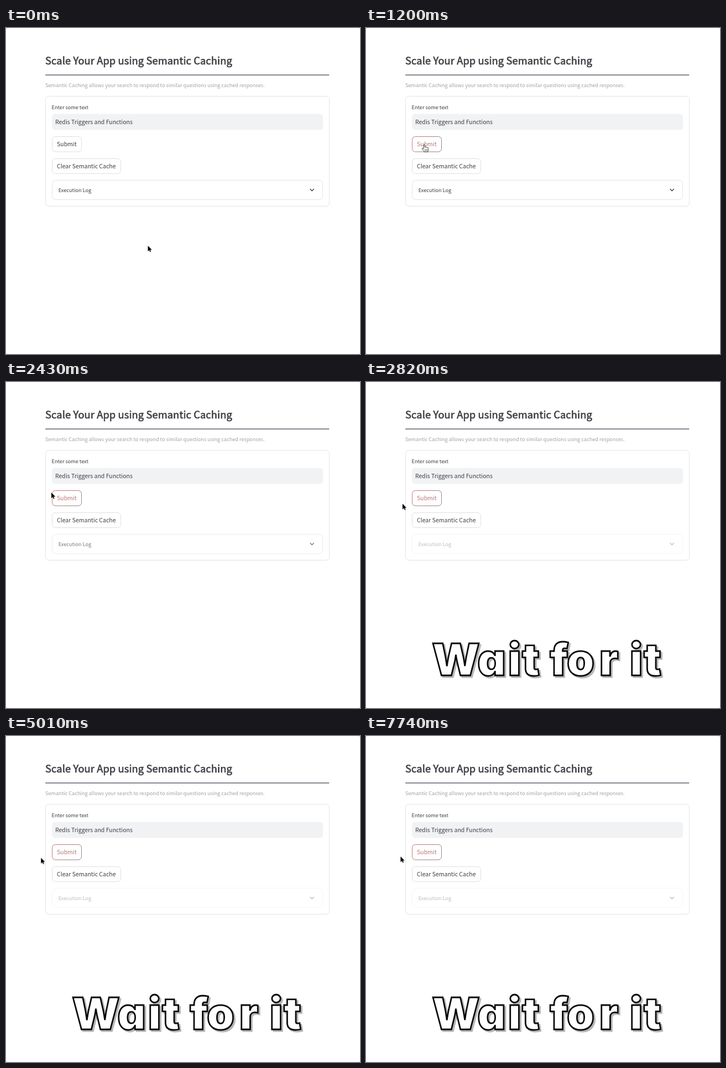
Write an HTML page that moves like this. It is 640 px wide and 590 px high and loops after 8000 ms.

```html
<!DOCTYPE html>
<html lang="en">
<head>
<meta charset="utf-8">
<title>Semantic Caching demo</title>
<style>
  html, body { margin: 0; width: 100%; height: 100%; overflow: hidden; background: #fff; }
  svg { display: block; width: 640px; height: 590px; }

  text { font-family: "Noto Sans CJK JP", "Noto Sans CJK SC", "Noto Sans CJK", "Open Sans", sans-serif; fill: #3e3e44; }
  .md { font-size: 10.5px; }
  .sm { font-size: 9.14px; }
  .title { font-size: 18.28px; letter-spacing: .12px; stroke: #3e3e44; stroke-width: .65px; }
  .caption { fill: #a2a2a6; }
  .box { fill: #fff; stroke: #e4e4e6; }
  .button { fill: #fff; stroke: #dfdfe2; }

  .submit-label { animation: label 8s step-end infinite; }
  .focus { animation: hover 8s step-end infinite; }
  .log { animation: stale 8s linear infinite; }
  .wait { animation: pop 8s step-end infinite; filter: drop-shadow(3px 3px 0 #b6b6b6); }
  .wait text {
    font: 900 80px Inter, Lato, sans-serif;
    font-feature-settings: "cv11";
    text-anchor: middle;
    fill: #fff; stroke: #0a0a0a; stroke-width: 2.8px; stroke-miterlimit: 3;
  }

  .cursor { animation: move 8s linear infinite; }
  .arrow { animation: arrow 8s step-end infinite; }
  .hand { animation: hand 8s step-end infinite; }

  @keyframes label { 0% { fill: #3e3e44; } 6.1%, 100% { fill: #c47270; } }
  @keyframes hover { 0% { opacity: 0; } 6.1%, 100% { opacity: 1; } }
  @keyframes stale {
    0% { opacity: 1; }
    22.5% { opacity: 1; animation-timing-function: ease-in; }
    35%, 100% { opacity: .33; }
  }
  @keyframes pop { 0% { opacity: 0; } 33%, 100% { opacity: 1; } }
  @keyframes arrow { 0% { opacity: 1; } 6.1% { opacity: 0; } 30%, 100% { opacity: 1; } }
  @keyframes hand { 0% { opacity: 0; } 6.1% { opacity: 1; } 30%, 100% { opacity: 0; } }
  @keyframes move {
    0%, .4% { transform: translate(256.5px, 394px); }
    3% { transform: translate(178px, 288px); }
    5.63% { transform: translate(128.5px, 224px); }
    7% { transform: translate(115px, 216px); }
    8.25%, 10.1% { transform: translate(109px, 213px); }
    15%, 22.5% { transform: translate(105.5px, 211px); }
    27% { transform: translate(95px, 204px); }
    30.38% { transform: translate(82px, 200px); }
    32.3% { transform: translate(74px, 211px); }
    35.25% { transform: translate(66px, 220.3px); }
    40.1%, 73.1% { transform: translate(63.2px, 220.5px); }
    74% { transform: translate(63px, 222px); }
    74.7%, 77.6% { transform: translate(63px, 220px); }
    79.5%, 85.1% { transform: translate(62.5px, 219px); }
    85.9%, 100% { transform: translate(62.5px, 218px); }
  }
</style>
</head>
<body>
<svg viewBox="0 0 640 590">
  <defs>
    <linearGradient id="focusLine">
      <stop offset="0" stop-color="#bd7f7f"/>
      <stop offset="1" stop-color="#958488"/>
    </linearGradient>
  </defs>
  <rect width="640" height="590" fill="#d4d4d4"/>
  <rect width="640" height="590" rx="3" fill="#fff"/>

  <text class="title" x="71" y="66.3">Scale Your App using Semantic Caching</text>
  <rect x="71" y="84" width="513.5" height="2" rx="1" fill="#89868f"/>
  <text class="sm caption" x="71" y="107.2">Semantic Caching allows your search to respond to similar questions using cached responses.</text>

  <rect class="box" x="71.5" y="123.5" width="513" height="199" rx="5.8"/>
  <text class="sm" x="82.6" y="147">Enter some text</text>
  <rect x="83" y="155.5" width="490" height="29" rx="5.8" fill="#f1f2f4"/>
  <text class="md" x="89" y="174">Redis Triggers and Functions</text>

  <rect class="button" x="83.5" y="196.5" width="53" height="27.5" rx="5.8"/>
  <rect class="focus" x="83.5" y="196.5" width="53" height="27.5" rx="5.8" fill="#fff" stroke="url(#focusLine)"/>
  <text class="md submit-label" x="92" y="214.2">Submit</text>

  <rect class="button" x="83.5" y="236.5" width="124" height="27" rx="5.8"/>
  <text class="md" x="92" y="253.7">Clear Semantic Cache</text>

  <g class="log">
    <rect class="box" x="83.5" y="275.5" width="489" height="35" rx="5.8"/>
    <text class="sm" x="94.8" y="296.6">Execution Log</text>
    <path d="M549.7 291.2l3.5 3.5l3.5-3.5" fill="none" stroke="#3e3e44" stroke-width="1.4"/>
  </g>

  <g class="wait">
    <text x="162.5 227 268.5 298 324 349 388 439 468 488.5 518" y="531">Wait for it</text>
  </g>

  <g class="cursor">
    <path class="arrow" d="M0 0V10.2L2.4 8L4 11.6L5.6 10.9L4.1 7.4H7.3Z" stroke="#fff" stroke-width="1.2" paint-order="stroke"/>
    <g class="hand" stroke="#1c1c1c" stroke-width=".9" stroke-linejoin="round">
      <path fill="#fff" d="M-1.2 7.6V1.2a1.2 1.2 0 0 1 2.4 0V5c.3-1 2.2-.9 2.3.3c.4-.9 2-.7 2.1.5c.5-.7 1.6-.3 1.6.7V9c0 1.5-1 2.2-1.2 4H-.4C-.9 11.3-3 9.6-3.9 7.8c-.5-1.2 1-1.9 1.7-1.1z"/>
      <path fill="none" stroke-width=".7" d="M1.2 8.5v2.6M3 8.5v2.6M4.8 8.5v2.6"/>
    </g>
  </g>
</svg>
</body>
</html>
```
